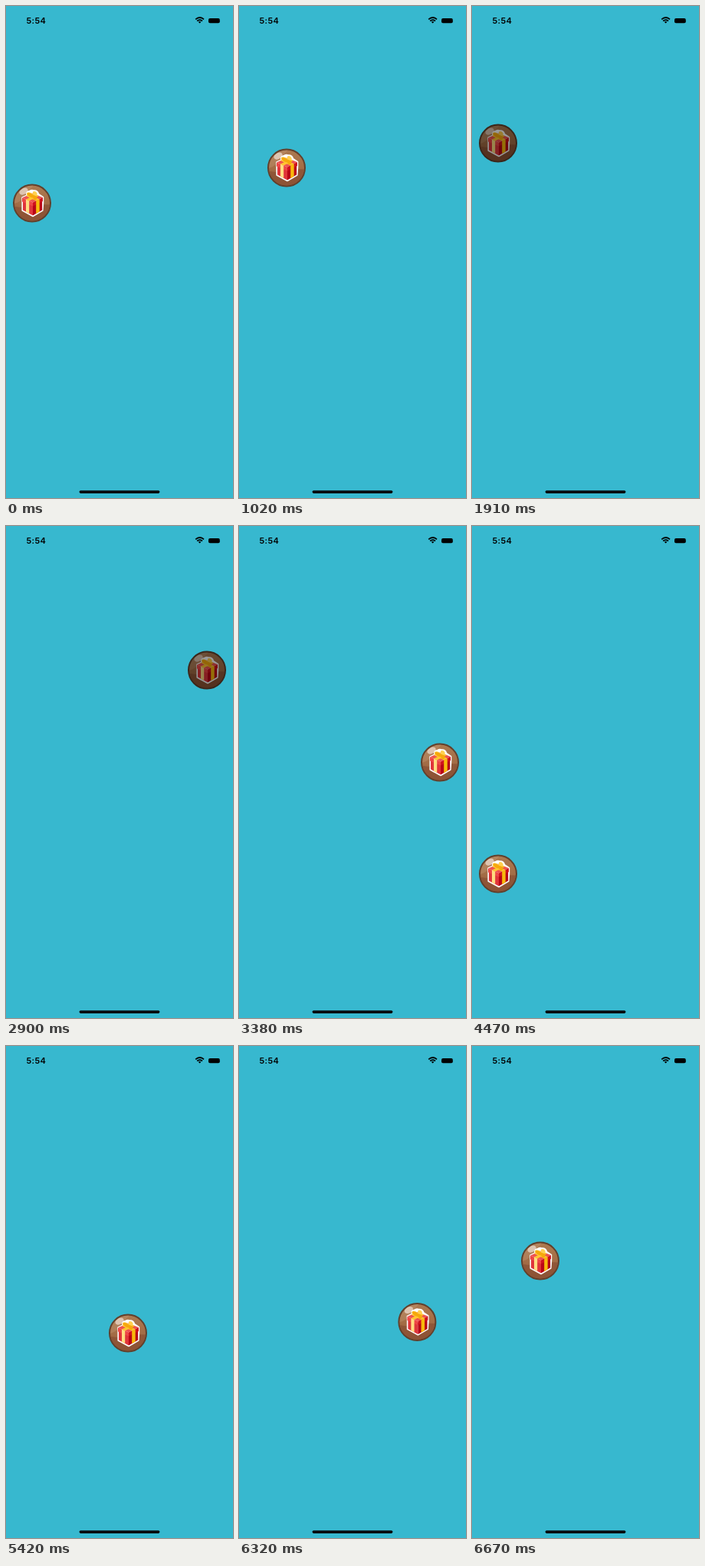
An HTML page that plays this animation: 296 px wide and 640 px high, repeating every 6.83 s.

```html
<!DOCTYPE html>
<html lang="en">
<head>
<meta charset="utf-8">
<title>Floating gift button</title>
<style>
  html, body { margin: 0; width: 100%; height: 100%; overflow: hidden; background: #37b8cf; }
  svg { display: block; }
  text { font: 600 11px Inter, "Liberation Sans", sans-serif; letter-spacing: .35px; }
</style>
</head>
<body>
<svg width="296" height="640" viewBox="0 0 296 640">
  <defs>
    <linearGradient id="wood" x1="0" y1="0" x2="0" y2="1">
      <stop offset="0" stop-color="#ad7a50"/>
      <stop offset=".5" stop-color="#a36d46"/>
      <stop offset="1" stop-color="#965835"/>
    </linearGradient>
    <clipPath id="disc"><circle r="23"/></clipPath>
  </defs>
  <rect width="296" height="640" fill="#37b8cf"/>

  <!-- status bar and home indicator -->
  <text x="26.5" y="23">5:54</text>
  <g fill="none" stroke="#000" stroke-width="1.7">
    <path d="M247.2 17.4Q252.6 12.6 258 17.4M249.2 19.5Q252.6 16.6 256 19.5"/>
    <path d="M250.8 20.8Q252.6 19.4 254.4 20.8L252.6 22.6Z" fill="#000" stroke="none"/>
  </g>
  <rect x="264" y="16" width="14.8" height="6.3" rx="2"/>
  <rect x="95.5" y="630.2" width="105" height="3.7" rx="1.8" fill="#06090b"/>

  <g id="ball">
    <circle r="24" fill="url(#wood)" stroke="#62402c" stroke-width="2"/>
    <g clip-path="url(#disc)">
      <path d="M-24 4Q-10 7 0 4T24 2V24H-24Z" fill="#8a5034" opacity=".75"/>
      <path d="M-23 0A23 23 0 0 1 2 -23Q-8 -13 -12 -7T-23 0Z" fill="#c29a79" opacity=".35"/>
      <ellipse cx="-11" cy="-15.5" rx="6" ry="4" transform="rotate(-30 -11 -15.5)" fill="#f1e2d6" opacity=".7"/>
    </g>
    <!-- white sticker edge -->
    <path d="M-13 -7.5L-7 -10.5Q-8 -15 -4 -15.5Q-1 -18 2 -16.5Q7 -17 8.5 -12L14.5 -8V-1L13.8 9.5L1 17L-12.8 9.5V-1Z"
      fill="#fff" stroke="#fff" stroke-width="1.5" stroke-linejoin="round"/>
    <path d="M-13 -7L0 -13L14 -7.5L1 -1Z" fill="#ee5350"/>
    <path d="M-12 -5L1 1V16L-12 9Z" fill="#e0353a"/>
    <path d="M1 1L13.2 -5V9L1 16Z" fill="#b90616"/>
    <path d="M-13 -7L1 -1V4L-13 -2Z" fill="#ee4646"/>
    <path d="M1 -1L14 -7.5V-2.5L1 4Z" fill="#cf121e"/>
    <path d="M-8 -5L-3.8 -3V13.5L-8 11.2Z" fill="#ffdc80"/>
    <path d="M5.2 -3L9.7 -5.3V11L5.2 13.7Z" fill="#f8b90b"/>
    <path d="M-8 -5L5 -11L9 -9.5L-3.8 -3ZM-8 -9.5L-4 -11L9.7 -5.3L5.2 -3Z" fill="#ffc632"/>
    <path d="M0 -8Q-8 -8 -7 -13Q-5 -16 1 -12Q0 -17 5 -15Q10 -10 1 -8Z" fill="#ffd04f"/>
    <path d="M1 -7Q-6 -8 -6.5 -13Q-3 -15 1 -11L6 -9Q8 -4 3 -4Z" fill="#f6a80b"/>
  </g>
</svg>
<script>
const ball = document.getElementById("ball");
const LOOP = 6830, LEFT = 34, RIGHT = 262;

// Each gesture follows a curve from the last resting place, bent by a point, in a few even steps.
const gestures = [
  { start: 870, end: 1320, bend: [97, 173], to: [LEFT, 179] },
  { start: 1910, end: 2270, bend: [150, 183], to: [RIGHT, 188] },
  { start: 2900, end: 3380, bend: [205, 260], to: [RIGHT, 308] },
  { start: 4020, end: 4470, bend: [414, 427], to: [LEFT, 453] },
  { start: 5090, end: 5420, bend: [95, 430], to: [159, 374] },
  { start: 6095, end: 6670, bend: [397, 340], to: [89, 280], steps: 5, held: true }
];

const curve = (a, b, c, u) => (1 - u) ** 2 * a + 2 * u * (1 - u) * b + u * u * c;

function pose(t) {
  let from = [LEFT, 257], pressed = false;
  for (const { start, end, bend, to, steps = 3, held } of gestures) {
    if (t < start) break;
    if (t < end) {
      const step = Math.floor((t - start) / (end - start) * steps);
      const [x, y] = from.map((a, i) => curve(a, bend[i], to[i], step / steps));
      from = [Math.max(LEFT, Math.min(RIGHT, x)), y];
      pressed = step === 0 && !held;
      break;
    }
    from = to;
  }
  return { x: from[0], y: from[1], pressed };
}

function draw(now) {
  const { x, y, pressed } = pose(now % LOOP);
  ball.setAttribute("transform", `translate(${x} ${y - 0.4})`);
  ball.style.filter = pressed ? "brightness(.6)" : "none";
}

const start = performance.now();
function tick() {
  draw(performance.now() - start);
  requestAnimationFrame(tick);
}
tick();
</script>
</body>
</html>
```
